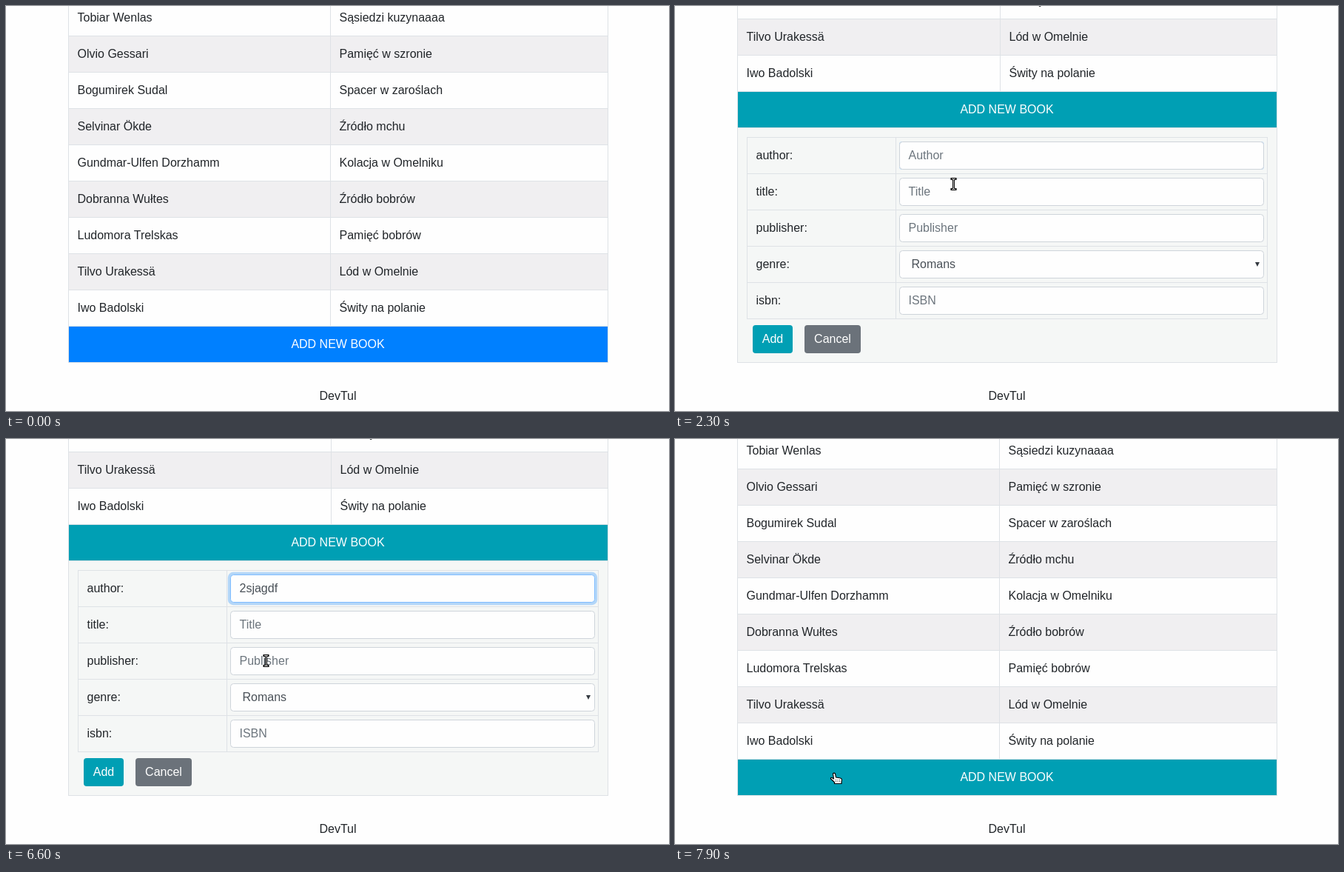
An HTML page that plays this animation: 896 px wide and 547 px high, repeating every 8 s.

```html
<!DOCTYPE html>
<html lang="pl">
<head>
<meta charset="utf-8">
<title>Book list</title>
<style>
  html, body { margin: 0; width: 100%; height: 100%; overflow: hidden; background: #fefefe; }
  svg { display: block; width: 896px; height: 547px; }
  text { font: 16px "Liberation Sans", Arial, sans-serif; fill: #212529; white-space: pre; }
  .mid { text-anchor: middle; }
  .light { fill: #fff; }
  .hint { fill: #6c757d; }
  .value { fill: #495057; }
  .field { fill: #fefefe; stroke: #ced4da; }
</style>
</head>
<body>
<svg id="stage" viewBox="0 0 896 547"></svg>
<script>
const LOOP = 8000, STEP = 100, ROW = 49;
const BLUE = '#0080ff', TEAL = '#009fb4', LINE = '#dee2e6';
const FORM_TOP = 177;

const books = [
  ['Tobiar Wenlas', 'Sąsiedzi kuzynaaaa'],
  ['Olvio Gessari', 'Pamięć w szronie'],
  ['Bogumirek Sudal', 'Spacer w zaroślach'],
  ['Selvinar Ökde', 'Źródło mchu'],
  ['Gundmar-Ulfen Dorzhamm', 'Kolacja w Omelniku'],
  ['Dobranna Wułtes', 'Źródło bobrów'],
  ['Ludomora Trelskas', 'Pamięć bobrów'],
  ['Tilvo Urakessä', 'Lód w Omelnie'],
  ['Iwo Badolski', 'Świty na polanie'],
];
const fields = ['Author', 'Title', 'Publisher', 'Genre', 'ISBN'];

// Pointer way-points: time, x, y
const path = [
  [600, 17, 461], [700, 110, 436], [800, 235, 444], [900, 273, 460], [1400, 273, 460],
  [1600, 309, 334], [1700, 309, 334], [1800, 325, 302], [2000, 325, 302], [2500, 410, 198],
  [6400, 410, 198], [6700, 321, 349], [6800, 321, 349], [7100, 198, 453],
  [7800, 198, 453], [7900, 215, 451],
];
const typing = [[3600, '2'], [4700, 's'], [5200, 'j'], [5400, 'a'], [5500, 'g'], [5800, 'df']];
const caretOn = [[2700, 3200], [3600, 4100], [4700, 6300], [6900, 7300]];
const OPEN = 1200, CLOSE = 7500;

const rect = (x, y, w, h, fill, extra = '') =>
  `<rect x="${x}" y="${y}" width="${w}" height="${h}" fill="${fill}" ${extra}/>`;
const text = (x, y, s, cls = '', extra = '') =>
  `<text x="${x}" y="${y}" class="${cls}" ${extra}>${s}</text>`;
const hline = (x, y, w) => rect(x, y, w, 1, LINE);
const vline = (x, y, h) => rect(x, y, 1, h, LINE);

// Table rows ending in a border at y = bottom
function bookRows(bottom, split) {
  let out = '';
  books.forEach(([author, title], i) => {
    const top = bottom - (books.length - i) * ROW;
    if (i % 2) out += rect(84, top, 730, ROW, '#f0eff1');
    out += hline(84, top, 730) + text(96.5, top + 30, author) + text(split + 12.5, top + 30, title);
  });
  return out + hline(84, bottom, 730) + vline(split, 0, bottom);
}

const addBar = (y, id) =>
  rect(85, y + 1, 728, 48, TEAL, `id="${id}"`) + text(448.5, y + 30, 'ADD NEW BOOK', 'mid light');

function formField(name, i) {
  const y = FORM_TOP + i * ROW;
  const isSelect = name === 'Genre';
  const id = i ? '' : 'id="author"';
  return hline(97, y, 704) + text(109.5, y + 30, name.toLowerCase() + ':') +
    (i ? '' : '<rect id="ring" fill="#b3d6f8"/>') +
    `<rect ${i ? '' : 'id="authorBox"'} class="field" x="303.5" y="${y + 6.5}" width="492" height="37" rx="4"/>` +
    (isSelect
      ? text(319.5, y + 30, 'Romans', 'value') + `<path d="M784 ${y + 22}h6l-3 6z" fill="#343a40"/>`
      : text(315.5, y + 30, name, 'hint', id));
}

const formPanel = () =>
  rect(84, 164, 730, 318, '#f5f7f6') + hline(84, 164, 730) + hline(84, 481, 730) +
  vline(97, FORM_TOP, 246) + vline(298, FORM_TOP, 246) + vline(800, FORM_TOP, 246) +
  hline(97, 422, 704) + fields.map(formField).join('') +
  rect(0, 193, 1, 17, '#495057', 'id="caret"') +
  rect(105, 431, 54, 38, TEAL, 'rx="4"') + text(132, 455, 'Add', 'mid light') +
  rect(175, 431, 76, 38, '#6b727a', 'rx="4" id="cancel"') + text(213, 455, 'Cancel', 'mid light');

const sides = vline(84, 0, 482) + vline(813, 0, 482);
const beam = 'M-2.5-6.5h5M0-6.5v14M-2.5 7.5h5';

const stage = document.getElementById('stage');
stage.innerHTML = `
  <g id="closed">${bookRows(432, 438)}${hline(84, 481, 730)}${addBar(432, 'bar')}${sides}</g>
  <g id="open">${bookRows(115, 439)}${addBar(115, 'openBar')}${formPanel()}${sides}</g>
  ${text(448.5, 532, 'DevTul', 'mid')}
  <g id="pointer">
    <path id="arrow" d="M.5 .5v16l3.8-3.6 2.6 6 2.7-1.2-2.6-5.8h5.2z" fill="#fff" stroke="#000"/>
    <g id="hand">
      <path d="M-1.5 1q1.5-1.6 3 0l1 5 6 1q2 .5 2 2.5l-.5 2.5v2.5h-9.500v-2l-5-4.500q-.5-2 1.500-1.500l2.500 1.500z"
        fill="#fff" stroke="#000" stroke-width="1.2" stroke-linejoin="round"/>
      <path d="M2.500 9v3M5 9v3M7.500 9v3" stroke="#000" stroke-width=".8" stroke-dasharray="1 1"/>
    </g>
    <g id="beam" fill="none">
      <path d="${beam}" stroke="#000" stroke-width="3" stroke-linecap="square"/>
      <path d="${beam}" stroke="#fff" stroke-width=".8"/>
    </g>
  </g>`;

const el = id => document.getElementById(id);
const show = (id, on) => el(id).setAttribute('display', on ? 'inline' : 'none');
const set = (id, attrs) => Object.entries(attrs).forEach(([k, v]) => el(id).setAttribute(k, v));
const clamp = v => Math.max(0, Math.min(1, v));

function pointerAt(t) {
  const next = path.findIndex(p => p[0] > t);
  if (next < 0) return path[path.length - 1].slice(1);
  const [t0, x0, y0] = path[next - 1], [t1, x1, y1] = path[next];
  const k = (t - t0) / (t1 - t0);
  return [Math.round(x0 + (x1 - x0) * k), Math.round(y0 + (y1 - y0) * k)];
}

function pointerShape(t, x, y, isOpen) {
  const inside = (left, top, w, h) => x >= left && x < left + w && y >= top && y < top + h;
  if (!isOpen || t < 1400) return inside(84, 432, 730, 49) ? 'hand' : 'arrow';
  if (inside(175, 431, 76, 38) || inside(105, 431, 54, 38)) return 'hand';
  const overText = fields.some((name, i) =>
    name !== 'Genre' && inside(303, FORM_TOP + 6 + i * ROW, 493, 38));
  return overText ? 'beam' : 'arrow';
}

function drawAuthor(t) {
  const typed = typing.filter(([at]) => t >= at).map(([, keys]) => keys).join('');
  const label = el('author');
  label.textContent = typed || 'Author';
  label.setAttribute('class', typed ? 'value' : 'hint');
  const width = typed ? label.getComputedTextLength() : 0;
  set('caret', { x: Math.round(316 + width) });
  show('caret', caretOn.some(([from, to]) => t >= from && t < to));

  const focus = t >= 7400 ? 0.7 : clamp((t - 2500) / 300);
  const s = 3.2 * focus;
  set('ring', { x: 303 - s, y: 183 - s, width: 493 + 2 * s, height: 38 + 2 * s, rx: 4 + s });
  el('authorBox').style.stroke = focus ? '#80bdff' : '';
}

function draw(now) {
  const t = Math.floor(now % LOOP / STEP) * STEP;
  const isOpen = t >= OPEN && t < CLOSE;
  show('open', isOpen);
  show('closed', !isOpen);
  set('bar', { fill: t < OPEN ? BLUE : TEAL });
  if (isOpen) drawAuthor(t);

  show('pointer', t >= path[0][0]);
  if (t >= path[0][0]) {
    const [x, y] = pointerAt(t);
    const shape = pointerShape(t, x, y, isOpen);
    ['arrow', 'hand', 'beam'].forEach(id => show(id, id === shape));
    set('pointer', { transform: `translate(${x + (shape === 'beam' ? 0.5 : 0)} ${y})` });
    set('cancel', { fill: t >= 7100 ? '#5a5f67' : '#6b727a' });
  }
}

const start = performance.now();
function frame() {
  draw(performance.now() - start);
  requestAnimationFrame(frame);
}
frame();
</script>
</body>
</html>
```
